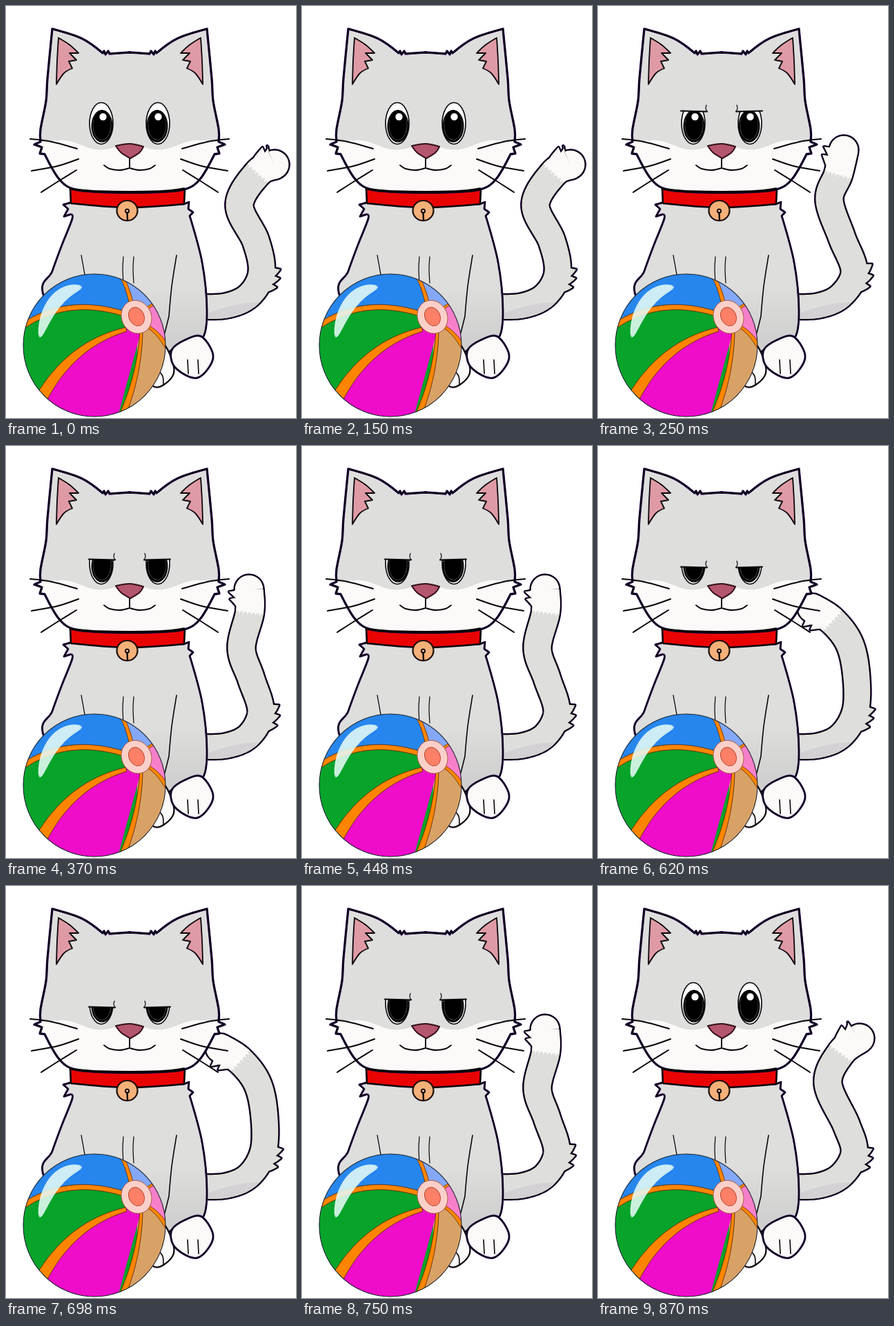
Write an HTML page with a canvas that moves like this. It is 420 px wide and 595 px high and loops after 1000 ms.

```html
<!DOCTYPE html>
<html lang="en">
<head>
<meta charset="utf-8">
<title>Cat with a ball</title>
<style>
html, body { margin: 0; width: 100%; height: 100%; overflow: hidden; background: #fff; }
canvas { display: block; width: 420px; height: 595px; }
</style>
</head>
<body>
<canvas id="stage" width="420" height="595"></canvas>
<script>
const ctx = document.getElementById('stage').getContext('2d');
ctx.lineCap = ctx.lineJoin = 'round';

const INK = '#08040a', FRINGE = '#3b0a80', FUR = '#dededc', WHITE = '#fbfaf8';
const AXIS = 179; // the face is symmetric about this x

const parse = text => text.trim().split(/\s+/).map(s => {
  const [x, y] = s.replace('!', '').split(',').map(Number);
  return { x, y, hard: s.endsWith('!') };
});

// Smooth path through points; a "!" in the text makes a point a corner.
function smooth(pts, closed) {
  const n = pts.length;
  const at = i => closed ? pts[(i + n) % n] : pts[Math.max(0, Math.min(n - 1, i))];
  const slope = i => {
    if (at(i).hard) return [0, 0];
    const a = at(i - 1), b = at(i + 1);
    return [(b.x - a.x) / 6, (b.y - a.y) / 6];
  };
  const path = new Path2D();
  path.moveTo(pts[0].x, pts[0].y);
  for (let i = 0; i < (closed ? n : n - 1); i++) {
    const p = at(i), q = at(i + 1), s = slope(i), t = slope(i + 1);
    path.bezierCurveTo(p.x + s[0], p.y + s[1], q.x - t[0], q.y - t[1], q.x, q.y);
  }
  if (closed) path.closePath();
  return path;
}

const loop = text => smooth(parse(text), true);

function mirrored(text) {
  const half = parse(text);
  const other = half.map(p => ({ ...p, x: 2 * AXIS - p.x })).reverse();
  return smooth([...half, ...other], true);
}

function fill(path, color) {
  ctx.fillStyle = color;
  ctx.fill(path);
}

function stroke(path, width = 2, color = INK) {
  ctx.lineWidth = width;
  ctx.strokeStyle = color;
  ctx.stroke(path);
}

const line = (text, width) => stroke(smooth(parse(text)), width);

function paint(path, color, width, ink) {
  fill(path, color);
  stroke(path, width, ink);
}

function contour(path, width) {
  stroke(path, width + 0.9, FRINGE);
  stroke(path, width);
}

function within(path, draw) {
  ctx.save();
  ctx.clip(path);
  draw();
  ctx.restore();
}

function bothSides(draw) {
  draw();
  ctx.save();
  ctx.translate(2 * AXIS, 0);
  ctx.scale(-1, 1);
  draw();
  ctx.restore();
}

function ellipse(x, y, rx, ry, turn = 0) {
  const path = new Path2D();
  path.ellipse(x, y, rx, ry, turn, 0, Math.PI * 2);
  return path;
}

// Outline of a band around the curve at(t); half(t, side) is its half width.
function ribbon(at, from, to, half, steps = 40) {
  const path = new Path2D();
  const edge = (t, side) => {
    const [x, y] = at(t), [ax, ay] = at(t - 0.001), [bx, by] = at(t + 0.001);
    const r = half(t, side) * side / Math.hypot(bx - ax, by - ay);
    path.lineTo(x - (by - ay) * r, y + (bx - ax) * r);
  };
  for (let i = 0; i <= steps; i++) edge(from + (to - from) * i / steps, -1);
  for (let i = steps; i >= 0; i--) edge(from + (to - from) * i / steps, 1);
  path.closePath();
  return path;
}

// Spine of each tail after the shared base; white fur starts at the last but one point.
const BASE = '272,434 318,433 352,418 ';
const TAILS = {
  right: '370,385 362,340 338,287 365,241 389,229',
  upRight: '371,385 360,346 333,285 352,241 379,220',
  up: '371,383 353,334 335,280 348,243 356,208',
  upLeft: '369,383 355,336 341,292 353,240 352,207',
  behind: '357,386 336,341 307,299 299,269 303,227',
  curled: '373,382 374,330 364,285 339,252 310,234'
};

function follow(pts) {
  const get = i => pts[Math.max(0, Math.min(pts.length - 1, i))];
  return t => {
    const i = Math.max(0, Math.min(pts.length - 2, Math.floor(t))), u = t - i;
    const [a, b, c, d] = [-1, 0, 1, 2].map(k => get(i + k));
    return ['x', 'y'].map(k => b[k] + u / 2 * (c[k] - a[k]
      + u * (2 * a[k] - 5 * b[k] + 4 * c[k] - d[k] + u * (3 * (b[k] - c[k]) + d[k] - a[k]))));
  };
}

// Saw-toothed fur between two places on an edge.
function fringe(t, from, to, count, height) {
  const u = (t - from) / (to - from) * count;
  return u > 0 && u < count ? height * (u % 1) : 0;
}

function drawTail(name) {
  const at = follow(parse(BASE + TAILS[name]));
  const half = (t, side) => 17 + t / 2
    + (side > 0 ? fringe(t, 2.5, 3.15, 3, 9) : fringe(t, 6.2, 6.95, 2, 9));
  const [x, y] = at(7), [px, py] = at(6.98);
  const angle = Math.atan2(y - py, x - px);
  const piece = from => {
    const path = ribbon(at, from, 7, half, 280);
    path.moveTo(x, y);
    path.arc(x, y, 20.3, angle - Math.PI / 2, angle + Math.PI / 2);
    path.closePath();
    return path;
  };
  const tail = piece(0);
  contour(tail, 4);
  fill(tail, FUR);
  within(tail, () => {
    fill(ellipse(325, 452, 68, 18, -0.25), '#d3d1d3');
    fill(piece(6), WHITE);
    const [ax, ay] = at(6), [bx, by] = at(6.03);
    ctx.translate(ax, ay);
    ctx.rotate(Math.atan2(by - ay, bx - ax));
    ctx.beginPath();
    for (let i = -8; i <= 8; i++) ctx.lineTo(i % 2 ? -4 : 3, i * 3);
    ctx.fill();
  });
}

function drawBody() {
  const body = loop(`93,284! 83,287! 90,293! 84,304! 93,301! 96,307 81,345 67,383 55,420
    120,530 210,530 236,500 262,483 285,479 291,440 284,370
    266,303! 271,298! 264,293! 265,283! 258,286!`);
  const coat = ctx.createLinearGradient(0, 400, 0, 490);
  coat.addColorStop(0, FUR);
  coat.addColorStop(1, '#cfcfcf');
  fill(body, coat);
  contour(body, 2);

  paint(loop('222,485 240,510 241,535 215,550 190,515'), WHITE, 2.2);
  const foot = loop('240,497 262,481 284,478 300,508 277,537 245,522');
  fill(foot, WHITE);
  contour(foot, 2);
  line('221,526 227,535 228,546', 1.6);
  for (const x of [263, 278]) line(`${x},511 ${x + 1},531`, 1.6);
  line('247,360 240,405 236,448! 230,472', 1.6);
  line('109,360 115,393', 1.3);
  for (const x of [170, 185]) line(`${x},362 ${x - 1},380 ${x},400`, 1.2);
}

function drawCollar() {
  paint(loop('93,264! 176,269 259,264! 258,286! 176,291 94,285!'), '#ea0303', 2.6);
  paint(ellipse(175.5, 295.5, 15, 14.5), '#f5b079', 2.2, '#1b0d08');
  stroke(ellipse(175.5, 296, 2.6, 2.6), 1.8);
  line('175.5,299 176,309', 2.4);
}

function drawHead() {
  const head = mirrored(`179,67 150,69! 148,65! 144,70! 142,65! 140,68! 110,47 67,33! 60,105
    58,137 50,178 50,196! 41,200! 52,204! 49,213! 56,214! 77,250 100,265 145,269`);
  fill(head, FUR);
  within(head, () => fill(mirrored('179,206 163,203 145,207 124,206 85,194 40,199! 40,280!'), WHITE));
  contour(head, 2.4);
  line('93,264 135,268 222,268 258,264', 3.4);

  bothSides(() => {
    paint(loop('76,46! 92,56 105,68! 92,68! 102,78! 91,80! 96,90! 84,97 73,113! 74,80'), '#df9ba5', 1.8);
    line('142,230 150,235 165,237 179,234', 2);
    line('35,192 66,196 103,206', 2);
    line('37,238 75,231 105,221', 2);
    line('51,269 76,253 102,237', 2);
  });
  line('179,220 179,234', 2);
  paint(loop('159,202! 179,199 199,203! 193,212 180,220! 167,212'), '#b4566c', 2, '#321019');
}

// "lid" is the height of the upper eyelid; 0 is wide open.
function drawEyes(lid) {
  if (lid > 180) return bothSides(() => line('121,190 134,195 148,191', 2.2));
  const open = new Path2D();
  open.rect(100, lid, 160, 220 - lid);
  within(open, () => {
    for (const x of [138, 220]) {
      paint(ellipse(x, 169.5, 17, 30), '#fff', 1.6);
      const pupil = x + Math.sign(AXIS - x);
      fill(ellipse(pupil, 173.5, 15.5, 23.5), '#000');
      stroke(ellipse(pupil, 172.5, 13, 21), 0.6, '#777');
      fill(ellipse(pupil, 171, 12.5, 20.5), '#000');
      fill(ellipse(pupil + 1.5, 160, 5.2, 5.2), lid > 160 ? '#000' : '#fff');
    }
  });
  if (lid) bothSides(() => {
    line(`120,${lid - 0.5} 158,${lid + 0.5}`, 2);
    line(`157,${lid - 9} 156,${lid - 4} 158,${lid}`, 1.2);
  });
}

const quad = (x0, y0, cx, cy, x1, y1) => t => {
  const u = 1 - t;
  return [u * u * x0 + 2 * u * t * cx + t * t * x1, u * u * y0 + 2 * u * t * cy + t * t * y1];
};

// Area on one side of a seam, closed through far corners.
function area(seam, color, far) {
  const path = new Path2D();
  for (let t = 0; t <= 1; t += 0.05) path.lineTo(...seam(t));
  parse(far).forEach(p => path.lineTo(p.x, p.y));
  fill(path, color);
}

function drawBall() {
  const ball = ellipse(128, 490, 103, 103);
  const upper = quad(26, 461, 92, 418, 176, 446);
  const lower = quad(53, 563, 96, 488, 174, 467);
  const side = quad(196, 468, 194, 530, 169, 590);
  const top = quad(169, 394, 177, 409, 182, 432);
  const right = quad(203, 438, 209, 433, 218, 428);
  const rear = quad(203, 462, 219, 469, 233, 492);

  fill(ball, '#2686ee');
  within(ball, () => {
    area(top, '#82a8f7', '190,450 240,430 220,380');
    area(right, '#f77fca', '240,420 240,500 190,460');
    area(rear, '#d8a267', '240,600 165,600 190,450');
    area(upper, '#08a42a', '190,450 190,600 0,600 0,470');
    area(lower, '#ef0cca', '190,450 196,468 160,600 50,600');
    area(side, '#d8a267', '165,600 215,600 210,465');
    const bands = [[upper, 8, 7], [lower, 17, 6], [side, 4, 9], [top, 5, 6], [right, 4, 3], [rear, 4, 6]];
    for (const [seam, w0, w1] of bands)
      paint(ribbon(seam, 0, 1, t => (w0 + (w1 - w0) * t) / 2), '#ff8500', 0.9, '#5a2c08');
    ctx.globalAlpha = 0.88;
    fill(ribbon(quad(110, 406, 64, 411, 49, 479), 0, 1, t => 10 * Math.sqrt(Math.sin(Math.PI * t))), '#e4fbf6');
    ctx.globalAlpha = 1;
  });
  stroke(ball, 1.1, '#1c2430');
  paint(ellipse(189, 449, 21.5, 24.5, -0.45), '#fcd0c9', 1, '#a5574a');
  paint(ellipse(189, 448.5, 11, 14, -0.45), '#ff8068', 1, '#b04a38');
}

const POSES = [
  { from: 0, tail: 'right', lid: 0 },
  { from: 250, tail: 'up', lid: 152 },
  { from: 370, tail: 'upLeft', lid: 164 },
  { from: 500, tail: 'behind', lid: 190 },
  { from: 620, tail: 'curled', lid: 175 },
  { from: 750, tail: 'upLeft', lid: 164 },
  { from: 870, tail: 'upRight', lid: 0 }
];

function draw({ tail, lid }) {
  ctx.fillStyle = '#fff';
  ctx.fillRect(0, 0, 420, 595);
  drawTail(tail);
  drawBody();
  drawCollar();
  drawHead();
  drawEyes(lid);
  drawBall();
}

const start = performance.now();
let shown;

function tick() {
  const t = (performance.now() - start) % 1000;
  const pose = POSES.filter(p => p.from <= t).pop();
  if (pose !== shown) draw(shown = pose);
  requestAnimationFrame(tick);
}
tick();
</script>
</body>
</html>
```
